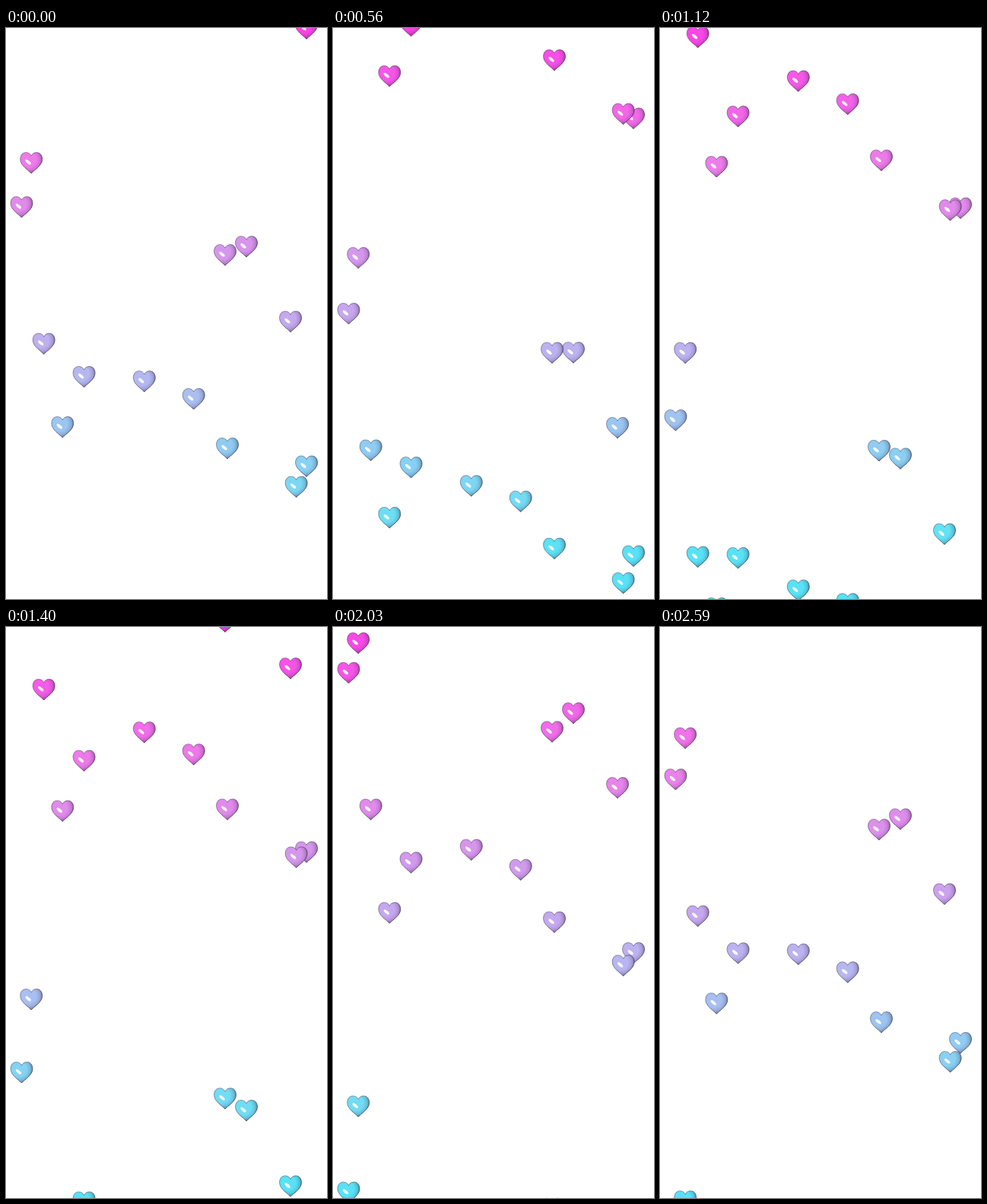
Write an HTML page without scripts that moves like this. It is 422 px wide and 750 px high and loops after 2.66 s.

```html
<!DOCTYPE html>
<html lang="en">
<head>
<meta charset="utf-8">
<title>Falling hearts</title>
<style>
  @property --tick { syntax: "<number>"; inherits: true; initial-value: 0; }

  html, body { margin: 0; width: 100%; height: 100%; overflow: hidden; background: #fff; }

  svg {
    display: block;
    width: 100vw;
    height: 100vh;
    animation: count 2.66s steps(38) infinite;
  }
  @keyframes count { from { --tick: 0; } to { --tick: 38; } }

  /* Each lane holds a heart and its follower, one 39-tick cycle behind. */
  .lane use {
    --lag: 0;
    --y: calc(var(--start) + var(--speed) * (var(--tick) - var(--lag)));
    /* Height sets the tint: magenta, lilac, then cyan. */
    --red: max(min(250 - .07 * var(--y), 273 - .2 * var(--y), 365 - .4 * var(--y)), 88);
    --green: min(66 + .32 * var(--y), 88 + .21 * var(--y), 226);
    --blue: 230 + .022 * var(--y);
    color: rgb(calc(var(--red)), calc(var(--green)), calc(var(--blue)));
    transform: translate(calc(var(--x) * 1px), calc(var(--y) * 1px));
  }
  .lane .follower { --lag: 39; }
</style>
</head>
<body>
<svg viewBox="0 0 422 750">
  <defs>
    <radialGradient id="shade" gradientUnits="userSpaceOnUse" cx="-3" cy="-4" r="19">
      <stop offset=".5" stop-color="#281840" stop-opacity="0"/>
      <stop offset=".75" stop-color="#281840" stop-opacity=".14"/>
      <stop offset="1" stop-color="#281840" stop-opacity=".5"/>
    </radialGradient>
    <linearGradient id="rim" gradientUnits="userSpaceOnUse" x1="-9" y1="-9" x2="9" y2="9">
      <stop offset="0" stop-color="#2c2438" stop-opacity=".4"/>
      <stop offset="1" stop-color="#2c2438" stop-opacity=".68"/>
    </linearGradient>
    <path id="outline" d="M0 14C-3 10-14.5 4-14.5-4.5C-14.5-10.5-11-13.5-7-13.5C-3.5-13.5-1-11.5 0-9C1-11.5 3.5-13.5 7-13.5C11-13.5 14.5-10.5 14.5-4.5C14.5 4 3 10 0 14Z"/>
    <g id="heart">
      <use href="#outline" fill="currentColor"/>
      <use href="#outline" fill="url(#shade)" stroke="url(#rim)"/>
      <ellipse cx="-4" cy="-.8" rx="4.5" ry="1.9" fill="#fff" opacity=".92" transform="rotate(40 -4 -.8)"/>
    </g>
  </defs>

  <g class="lane" style="--x:33.2;--start:177;--speed:15.6"><use href="#heart"/><use href="#heart" class="follower"/></g>
  <g class="lane" style="--x:20.5;--start:235;--speed:17.5"><use href="#heart"/><use href="#heart" class="follower"/></g>
  <g class="lane" style="--x:316;--start:287;--speed:17.4"><use href="#heart"/><use href="#heart" class="follower"/></g>
  <g class="lane" style="--x:288;--start:298;--speed:16.06"><use href="#heart"/><use href="#heart" class="follower"/></g>
  <g class="lane" style="--x:374;--start:385.5;--speed:17.44"><use href="#heart"/><use href="#heart" class="follower"/></g>
  <g class="lane" style="--x:49.7;--start:414.5;--speed:17.5"><use href="#heart"/><use href="#heart" class="follower"/></g>
  <g class="lane" style="--x:102.6;--start:458;--speed:14.87"><use href="#heart"/><use href="#heart" class="follower"/></g>
  <g class="lane" style="--x:181.8;--start:464;--speed:17.15"><use href="#heart"/><use href="#heart" class="follower"/></g>
  <g class="lane" style="--x:246.7;--start:487;--speed:16.83"><use href="#heart"/><use href="#heart" class="follower"/></g>
  <g class="lane" style="--x:74.3;--start:524;--speed:14.87"><use href="#heart"/><use href="#heart" class="follower"/></g>
  <g class="lane" style="--x:291;--start:552;--speed:16.45"><use href="#heart"/><use href="#heart" class="follower"/></g>
  <g class="lane" style="--x:395;--start:575.5;--speed:14.74"><use href="#heart"/><use href="#heart" class="follower"/></g>
  <g class="lane" style="--x:381.6;--start:602.5;--speed:15.8"><use href="#heart"/><use href="#heart" class="follower"/></g>
</svg>
</body>
</html>
```
